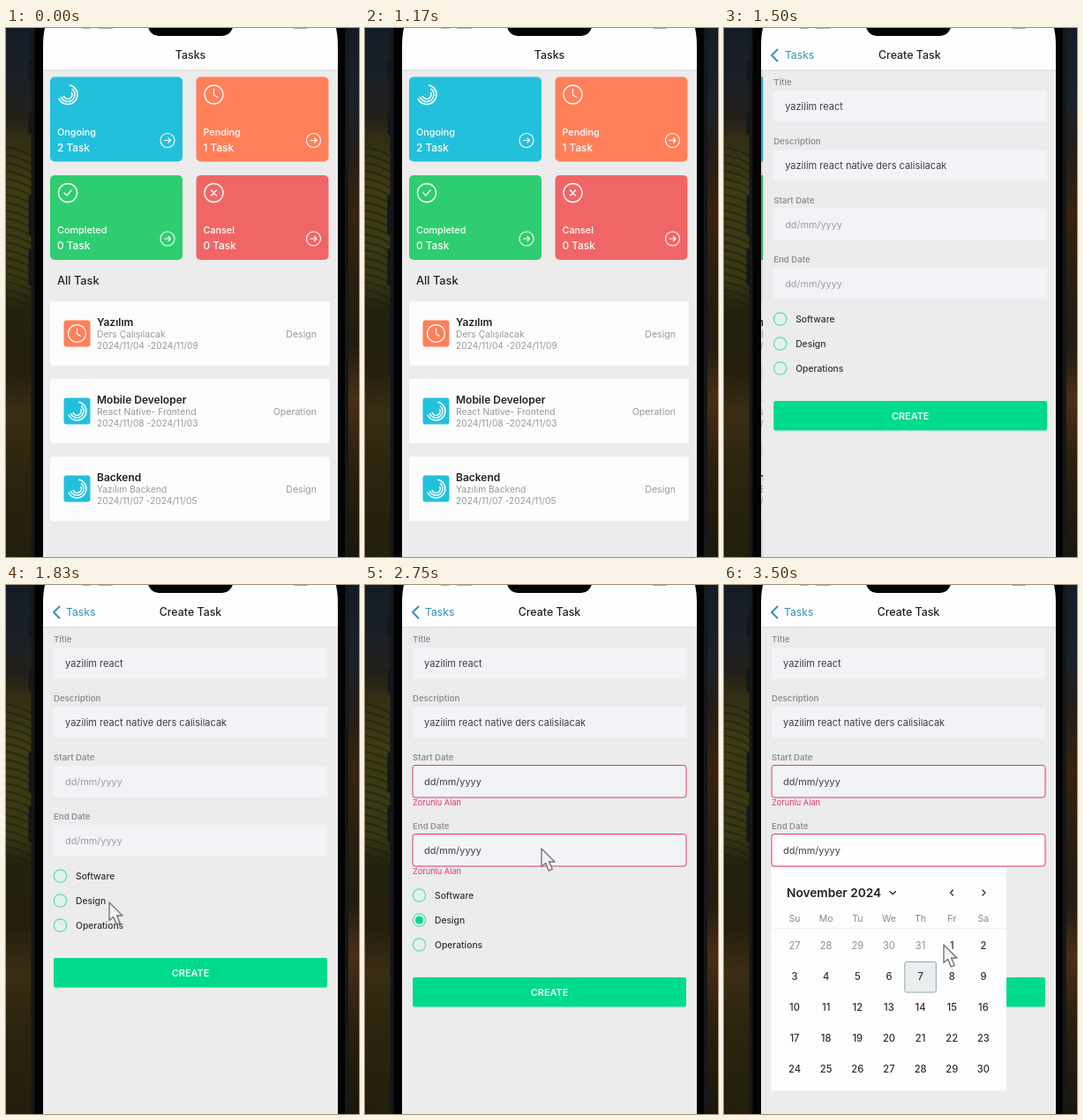
An HTML page for the animation above (3580 ms loop, 400 by 600 pixels).

```html
<!DOCTYPE html>
<html lang="en">
<head>
<meta charset="utf-8">
<title>Task app</title>
<style>
html, body { margin: 0; width: 100%; height: 100%; overflow: hidden; background: #111; }
svg { display: block; width: 400px; height: 600px; font-family: Inter, Roboto, sans-serif; }
#soft { filter: blur(0.4px); }
</style>
</head>
<body>
<svg id="stage" viewBox="0 0 400 600" xmlns="http://www.w3.org/2000/svg"></svg>
<script>
const LOOP = 3580, STEP = 1000 / 12, WIDTH = 334;
const stage = document.getElementById('stage');

const text = (x, y, size, str, fill = '#333', weight = 400, anchor = 'start') =>
  `<text x="${x}" y="${y}" font-size="${size}" fill="${fill}" font-weight="${weight}" text-anchor="${anchor}">${str}</text>`;
const rect = (x, y, w, h, fill, r = 0, extra = '') =>
  `<rect x="${x}" y="${y}" width="${w}" height="${h}" rx="${r}" fill="${fill}" ${extra}/>`;
const line = (d, color, width = 1.3, extra = '') =>
  `<path d="${d}" fill="none" stroke="${color}" stroke-width="${width}" stroke-linecap="round" stroke-linejoin="round" ${extra}/>`;
const ring = (x, y, r, color = '#fff', width = 1.3, extra = '', fill = 'none') =>
  `<circle cx="${x}" cy="${y}" r="${r}" fill="${fill}" stroke="${color}" stroke-width="${width}" ${extra}/>`;
const group = (id, body, extra = '') => `<g id="${id}" ${extra}>${body}</g>`;

// Icons are drawn around their own centre.
const icons = {
  ongoing: [11, 8, 5].map((r, i) =>
    ring(0, 0, r, '#fff', 1.6, `pathLength="100" stroke-dasharray="${66 - i * 6} 100" transform="rotate(${-80 + i * 25})"`)).join(''),
  pending: ring(0, 0, 10.5) + line('M0 -6V0.5L4 3', '#fff'),
  done: ring(0, 0, 10.5) + line('M-4 0L-1 3L4 -3', '#fff'),
  cancel: ring(0, 0, 10.5) + line('M-3 -3L3 3M3 -3L-3 3', '#fff', 1.6),
  arrow: ring(0, 0, 8, '#fff', 1.1) + line('M-3.5 0H3.5M1 -2.5L3.5 0L1 2.5', '#fff', 1.2)
};
const icon = (name, x, y, scale = 1) => `<g transform="translate(${x} ${y}) scale(${scale})">${icons[name]}</g>`;

const card = (x, y, color, name, label, count) =>
  rect(x, y, 150, 96, color, 5) + icon(name, x + 20, y + 20) +
  text(x + 8, y + 66, 10.8, label, '#fff', 500) +
  text(x + 8, y + 84, 11.8, `${count} Task`, '#fff', 500) +
  icon('arrow', x + 133, y + 72);

const row = (y, color, name, title, sub, dates, kind) =>
  rect(50, y, 317, 73, '#fcfcfc', 3) + rect(65.5, y + 21.5, 30, 30, color, 3) +
  icon(name, 80.5, y + 36.5, 0.95) +
  text(103, y + 28, 12, title, '#222', 600) +
  text(103, y + 41.3, 10.3, sub, '#9a9a9a') +
  text(103, y + 54.3, 10.2, dates, '#9a9a9a') +
  text(352, y + 41, 10.6, kind, '#999', 400, 'end');

const TEAL = '#23c0dc', ORANGE = '#ff7f59', MINT = '#00db8b', ROSE = '#e23b62', BLUE = '#358eb5';

const taskList = rect(42, 48, WIDTH, 552, '#ececec') +
  card(50, 55.5, TEAL, 'ongoing', 'Ongoing', 2) +
  card(215.5, 55.5, ORANGE, 'pending', 'Pending', 1) +
  card(50, 167, '#2ece70', 'done', 'Completed', 0) +
  card(215.5, 167, '#f06666', 'cancel', 'Cansel', 0) +
  text(58, 291, 12.8, 'All Task', '#222', 500) +
  row(310, ORANGE, 'pending', 'Yazılım', 'Ders Çalışılacak', '2024/11/04 -2024/11/09', 'Design') +
  row(398, TEAL, 'ongoing', 'Mobile Developer', 'React Native- Frontend', '2024/11/08 -2024/11/03', 'Operation') +
  row(486, TEAL, 'ongoing', 'Backend', 'Yazılım Backend', '2024/11/07 -2024/11/05', 'Design');

const label = (y, str) => text(54, y - 6.3, 9.6, str, '#8d929a', 600);
const field = (y, name, value) => label(y, name) +
  rect(54, y, 310, 35.5, '#f2f3f7', 2) + text(67, y + 21.8, 11, value, '#3d3f44');
const dateField = (id, y, name) => label(y, name) +
  rect(54, y, 310, 35.5, '#f2f3f7', 2, `id="${id}Box"`) +
  `<g id="${id}Text">${text(67, y + 21.8, 10.9, 'dd/mm/yyyy', 'inherit')}</g>` +
  group(id + 'Error', rect(54, y - 0.5, 310, 36.5, 'none', 3, `stroke="${ROSE}"`) +
    text(54, y + 45, 9.2, 'Zorunlu Alan', ROSE));
const radio = (y, name) => ring(61.5, y, 7.2, '#5fdcae', 1.3, '', '#e4f1eb') +
  text(79, y + 3.8, 10.3, name, '#333', 500);

const form = rect(42, 48, WIDTH, 552, '#ececec') +
  field(71, 'Title', 'yazilim react') +
  field(138, 'Description', 'yazilim react native ders calisilacak') +
  dateField('start', 205, 'Start Date') +
  group('endDate', dateField('end', 272, 'End Date')) +
  group('lower', radio(330, 'Software') + radio(358, 'Design') + radio(386, 'Operations') +
    `<circle id="dot" cx="61.5" cy="358" r="4.6" fill="${MINT}"/>` +
    rect(54, 423, 310, 33.5, MINT, 2) + text(209, 443.8, 10.9, 'CREATE', '#e9fff6', 600, 'middle'));

function calendar() {
  const column = i => 80 + 35.65 * i;
  let out = rect(53.5, 320.5, 266.5, 253, '#fdfdfd') + rect(54, 389, 266, 1, '#f1f1f1') +
    text(71, 353.7, 13.7, 'November 2024', '#222', 600) +
    line('M188 347.5L191.2 350.7L194.4 347.5', '#333', 1.4) +
    line('M259.5 346L256.5 349L259.5 352', '#333', 1.4) +
    line('M293 346L296 349L293 352', '#333', 1.4) +
    rect(204.8, 427.5, 35.5, 34.5, '#ebeeee', 2, 'stroke="#8fa8b3"');
  ['Su', 'Mo', 'Tu', 'We', 'Th', 'Fr', 'Sa'].forEach((day, i) => {
    out += text(column(i), 382, 10.6, day, '#8b8b8b', 400, 'middle');
  });
  for (let i = 0; i < 35; i++) {
    const previous = i < 5;
    out += text(column(i % 7), 413.3 + 35 * Math.floor(i / 7), 11.2, previous ? 27 + i : i - 4,
      previous ? '#8f8f8f' : '#303030', previous ? 400 : 500, 'middle');
  }
  return out;
}

function backdrop() {
  const gradient = (id, stops) => `<linearGradient id="${id}" x2="0" y2="1">` +
    stops.map(([at, color]) => `<stop offset="${at}" stop-color="${color}"/>`).join('') + '</linearGradient>';
  let out = '<defs>' +
    gradient('left', [[0, '#141c26'], [.1, '#1a2026'], [.17, '#241f18'], [.21, '#322e14'], [.3, '#3d3b13'],
      [.47, '#383713'], [.53, '#22220f'], [.65, '#261e0e'], [.73, '#3a2d12'], [.84, '#2b240e'], [1, '#221f0d']]) +
    gradient('right', [[0, '#141c28'], [.15, '#1a222a'], [.23, '#241d17'], [.35, '#38230f'],
      [.46, '#2c1f10'], [.6, '#211c10'], [.7, '#4b2e15'], [.82, '#2d200e'], [1, '#1a170c']]) +
    '<clipPath id="screen"><path d="M42 600V22C42 10 43 4 45 -4H373C375 4 376 10 376 22V600Z"/></clipPath></defs>' +
    rect(0, 0, 200, 600, 'url(#left)') + rect(200, 0, 200, 600, 'url(#right)');
  for (let y = 135; y < 310; y += 9) {
    out += line(`M0 ${y}Q15 ${y + 2} 30 ${y + 11}`, '#1a1c0b', 2.2, 'opacity=".55"');
  }
  [[36, 24], [96, 25], [190, 45], [250, 42]].forEach(([y, h]) => {
    out += rect(25.5, y, 5, h, '#15161a', 2);
  });
  return out + rect(28.5, -20, 359.5, 660, '#15171a', 8) + rect(32.5, -20, 351.5, 660, '#030304', 8);
}

const statusBar = rect(86, -2, 10, 3, '#b5b5b5', 1) + rect(104, -2, 17, 3, '#b5b5b5', 1) +
  rect(326, -4, 16, 5, '#aaa', 1.5) +
  '<path d="M160 -4Q163 9 173 9H245Q255 9 258 -4Z" fill="#030304"/>';

const header = rect(42, -5, WIDTH, 53, '#fdfdfd') + rect(42, 47.5, WIDTH, 1, '#d6d6d6') +
  group('listTitle', text(209, 35.2, 12.4, 'Tasks', '#222', 500, 'middle')) +
  group('back', line('M60.5 24.5L54 31L60.5 37.5', BLUE, 1.9) +
    group('backLabel', text(68, 35.2, 12.2, 'Tasks', BLUE))) +
  group('formTitle', text(209, 35.2, 12.4, 'Create Task', '#222', 500, 'middle'));

const screen = group('list', taskList) + rect(42, 48, WIDTH, 552, '#000', 0, 'id="shade"') +
  group('form', form + group('calendar', calendar())) + header + statusBar;
const pointer = '<path d="M0 0V20.5L4.6 16.4L8.3 25L12.2 23.3L8.6 15H15Z" fill="#f1f1f1" stroke="#777" stroke-width="1.4" stroke-linejoin="round"/>';
stage.innerHTML = group('soft', backdrop() + `<g clip-path="url(#screen)">${screen}</g>` + group('cursor', pointer));

const parts = {};
stage.querySelectorAll('[id]').forEach(el => parts[el.id] = el);
const show = (id, on) => parts[id].setAttribute('display', on ? 'inline' : 'none');
const move = (id, x, y = 0) => parts[id].setAttribute('transform', `translate(${x} ${y})`);
const fade = (id, value) => parts[id].setAttribute('opacity', value);

// Cursor stops: time, x, y.
const route = [[1500, 150, 620], [1833, 117, 360], [2000, 63, 358], [2250, 205, 435], [2417, 205, 435],
  [2667, 200, 298], [2833, 200, 300], [3083, 216, 366], [3500, 249, 408]];

function cursorAt(t) {
  const next = route.findIndex(stop => stop[0] > t);
  if (next === 0) return route[0].slice(1);
  if (next < 0) return route[route.length - 1].slice(1);
  const [t0, x0, y0] = route[next - 1], [t1, x1, y1] = route[next];
  const k = (t - t0) / (t1 - t0), e = k * k * (3 - 2 * k);
  return [x0 + (x1 - x0) * e, y0 + (y1 - y0) * e];
}

function render(time) {
  const t = Math.floor((time + 4) / STEP) * STEP;
  const pushed = Math.max(0, t - 1166.7);
  let offset = WIDTH * Math.exp(-pushed / 66.3);
  if (offset < 1) offset = 0;
  const progress = 1 - offset / WIDTH;
  const started = pushed > 1;
  const invalid = t > 2300, picking = t > 2800;

  move('list', -100 * progress);
  fade('shade', 0.1 * progress);
  show('form', started);
  move('form', offset);
  show('listTitle', progress < 0.9);
  move('listTitle', -124 * progress);
  fade('listTitle', Math.max(0, 1 - progress * 1.3));
  show('back', started);
  fade('back', progress);
  move('backLabel', offset * 0.4);
  show('formTitle', started);
  move('formTitle', offset * 0.59);
  fade('formTitle', progress);

  move('endDate', 0, invalid ? 11 : 0);
  move('lower', 0, invalid ? 22 : 0);
  show('dot', t > 1980);
  for (const id of ['start', 'end']) {
    show(id + 'Error', invalid);
    parts[id + 'Text'].setAttribute('fill', invalid ? '#3d3f44' : '#9b9ca0');
  }
  parts.endBox.setAttribute('fill', picking ? '#fefefe' : '#f2f3f7');
  show('calendar', picking);
  show('cursor', t > 1490);
  move('cursor', ...cursorAt(t));
}

const origin = performance.now();
function tick() {
  render((performance.now() - origin) % LOOP);
  requestAnimationFrame(tick);
}
tick();
</script>
</body>
</html>
```
